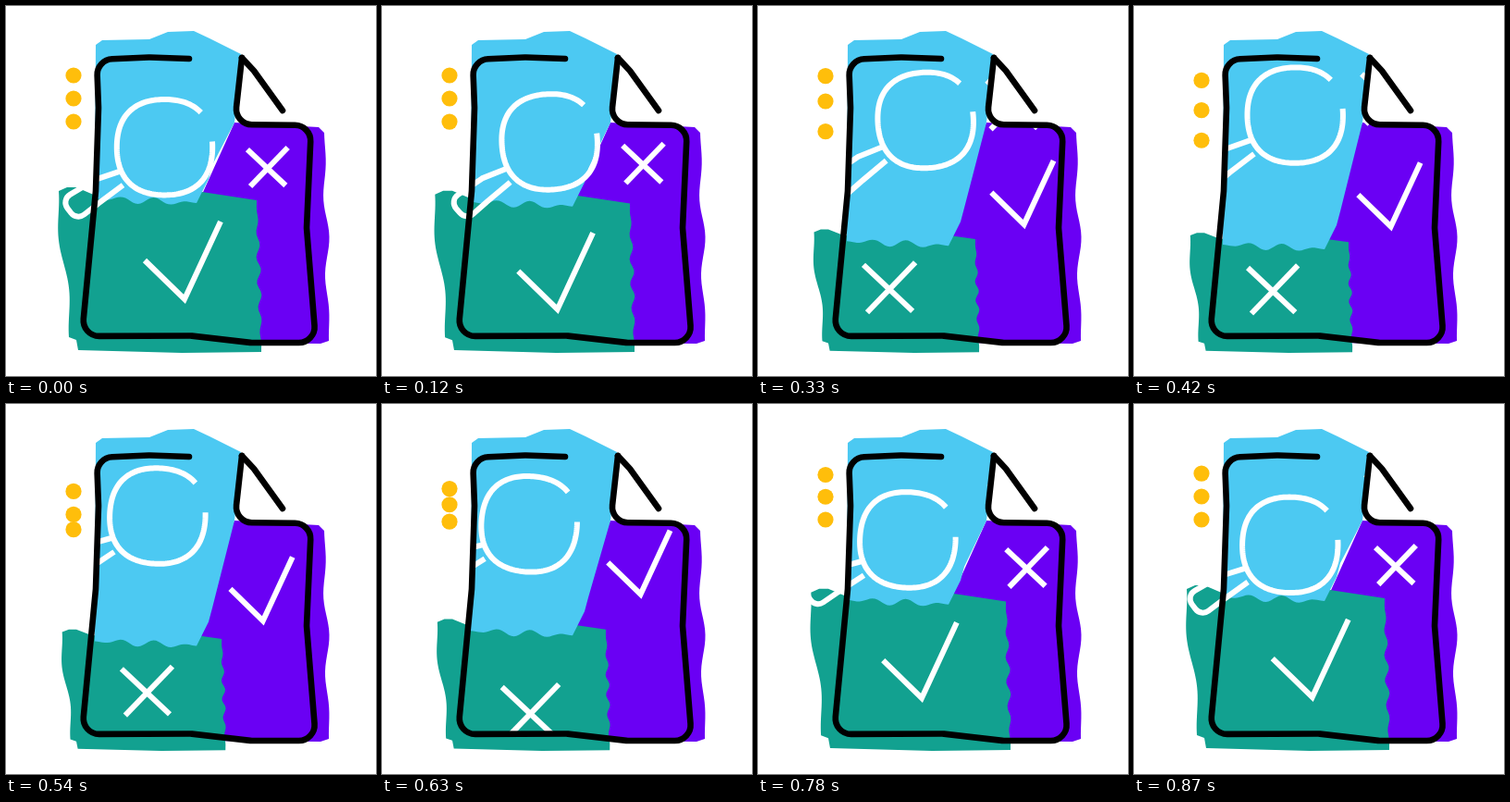
Write an HTML page with a canvas that moves like this. It is 400 px wide and 400 px high and loops after 0.9 s.

```html
<!DOCTYPE html>
<html lang="en">
<head>
<meta charset="utf-8">
<title>Document check</title>
<style>
html, body { margin: 0; width: 100%; height: 100%; overflow: hidden; background: #fff; }
canvas { display: block; width: 400px; height: 400px; }
</style>
</head>
<body>
<canvas id="stage" width="400" height="400"></canvas>
<script>
const ctx = document.getElementById('stage').getContext('2d');
const LOOP = 900, STEP = 30, TAU = 2 * Math.PI;
const BLUE = '#4cc9f2', PURPLE = '#6a00f4', GREEN = '#12a190', YELLOW = '#ffbe0b';

const ease = p => p < .5 ? 4 * p ** 3 : 1 - 4 * (1 - p) ** 3;
const mix = (a, b, k) => a + (b - a) * k;

// Straight edge with a sine ripple that fades out at both ends
function ripple([x0, y0], [x1, y1], height, waves) {
  const dx = x1 - x0, dy = y1 - y0, length = Math.hypot(dx, dy);
  return Array.from({ length: 41 }, (_, i) => {
    const u = i / 40;
    const k = height * Math.sin(TAU * waves * u) * Math.sin(Math.PI * u) / length;
    return [x0 + dx * u - dy * k, y0 + dy * u + dx * k];
  });
}

function trace(points) {
  ctx.beginPath();
  points.forEach(([x, y]) => ctx.lineTo(x, y));
}

function fillShape(points, color) {
  ctx.fillStyle = color;
  trace(points);
  ctx.fill();
}

function line(...points) {
  trace(points);
  ctx.stroke();
}

// Open path with rounded bends
function bend(points, radius) {
  ctx.beginPath();
  ctx.moveTo(...points[0]);
  for (let i = 1; i < points.length - 1; i++) ctx.arcTo(...points[i], ...points[i + 1], radius);
  ctx.lineTo(...points[points.length - 1]);
}

function pagePath() {
  bend([[198, 57], [155, 55.5], [98, 58], [100, 110], [97, 200], [82, 357], [200, 356.5],
    [265, 364], [335, 364], [325, 240], [330, 129], [247, 128], [255, 56]], 17);
}

function pen(color, width, style, join) {
  ctx.strokeStyle = color;
  ctx.lineWidth = width;
  ctx.lineCap = style;
  ctx.lineJoin = join;
}

function cross(x, y, r) {
  line([x - 1.05 * r, y - .9 * r], [x + .92 * r, y + .95 * r]);
  line([x + 1.03 * r, y - r], [x - .9 * r, y + r]);
}

// x, y is the lower corner of the tick
function tick(x, y, s) {
  line([x - 43 * s, y - 42 * s], [x, y], [x + 39 * s, y - 84 * s]);
}

// In each half of the loop the tick and the cross trade places
function marks(firstHalf, e) {
  const left = 1 - e;
  if (firstHalf) {
    const out = e ** 1.15;
    tick(193 - 44 * e, 317 + 145 * e, 1 - .2 * e);
    cross(150.5 - 108 * left, 306.5 - 30 * left, 26 + 13 * left);
    cross(283 - 7 * out, 174 - 75 * out, 21 + 7.5 * out);
    tick(277.5 + 133 * left, 238.5 - 32 * left, .82);
  } else {
    cross(151.5 + 36 * e, 307 + 100 * e, 26 + 14 * e);
    tick(193 - 211 * left, 317 + 12 * left, 1 - .38 * left);
    tick(277.5 + 8 * e, 238.5 - 128 * e, .82);
    cross(283 + 103 * left, 174 + 32 * left, 21 + 6 * left);
  }
}

function magnifier(t) {
  const a = t / LOOP * TAU;
  ctx.save();
  ctx.translate(171.5 + 13 * Math.sin(a), 135.2 + 17.5 * Math.cos(a));
  ctx.rotate(-.08 * Math.sin(a));

  // slightly squared circle with a gap at the upper right
  ctx.beginPath();
  for (let v = -.12; v < TAU - .74; v += .04) {
    const r = 53 - 1.3 * Math.cos(4 * v);
    ctx.lineTo(r * Math.cos(v), r * Math.sin(v));
  }
  ctx.stroke();

  bend([[-48, 26], [-75, 35], [-112, 57], [-95, 79], [-72, 61], [-45, 41]], 10);
  ctx.stroke();
  ctx.restore();
}

function dots(t) {
  ctx.fillStyle = YELLOW;
  [570, 510, 435].forEach((peak, i) => {
    const drop = 20.5 * Math.exp(-(((t - peak) / 130) ** 2));
    ctx.beginPath();
    ctx.arc(73, 75 + 25 * i + drop, 8.6, 0, TAU);
    ctx.fill();
  });
}

function blocks(open) {
  fillShape([[200, 230], [247, 126], [338, 131], ...ripple([344, 137], [349, 362], -3, 2.5),
    [340, 365], [200, 364]], PURPLE);

  const green = [[57, 200], [66, 196], [76, 196], [97, 205], [212, 201],
    ...ripple([271, 210], [276, 374], 2.5, 6), [190, 375], [78, 372], [76, 361],
    ...ripple([68, 358], [57, 200], 5, 1)];
  fillShape(green.map(([x, y]) => [mix(x, 76, .2 * open), mix(y, 375, .275 * open)]), GREEN);

  const lower = [[223, 172], [219, 187], ...ripple([206, 213], [96, 208], 4, 3)];
  fillShape([[97, 42], [104, 37], [155, 36], [175, 28], [203, 27], [220, 35], [254, 52], [247, 126],
    ...lower.map(([x, y]) => [x, y + 50 * open])], BLUE);
}

function draw(t) {
  const half = LOOP / 2, firstHalf = t < half;
  const e = ease((t % half) / half);

  ctx.fillStyle = '#fff';
  ctx.fillRect(0, 0, 400, 400);
  dots(t);
  blocks(firstHalf ? e : 1 - e);

  pen('#fff', 6, 'butt', 'miter');
  ctx.save();
  pagePath();
  ctx.clip();
  marks(firstHalf, e);
  ctx.restore();
  magnifier(t);

  pen('#000', 6.6, 'round', 'round');
  pagePath();
  ctx.stroke();
  line([255, 56], [268, 70], [299, 113]);
}

const start = performance.now();
function frame() {
  const t = (performance.now() - start) % LOOP;
  draw(Math.floor(t / STEP) * STEP);
  requestAnimationFrame(frame);
}
frame();
</script>
</body>
</html>
```
